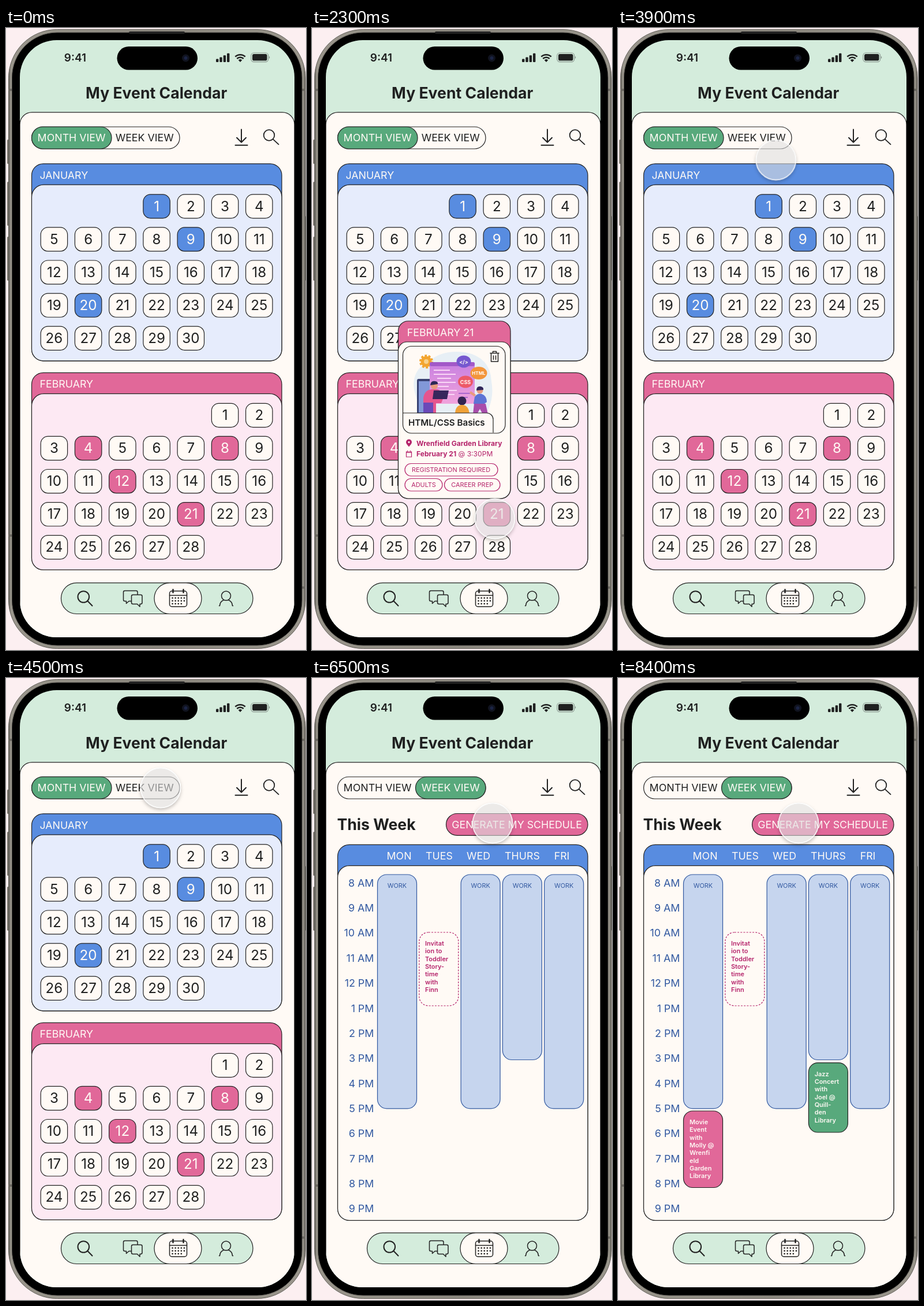
These frames come from a looping animation (520 px wide and 1076 px high, 8.5 s). An HTML page:

```html
<!DOCTYPE html>
<html lang="en">
<head>
<meta charset="utf-8">
<title>My Event Calendar</title>
<style>
  html, body { margin: 0; width: 100%; height: 100%; overflow: hidden; background: #fceff1; }
  svg { display: block; width: 100%; height: 100%; }
  text { font-family: Inter, Roboto, sans-serif; font-optical-sizing: none; font-size: 17.8px; fill: #1f2020; white-space: pre; }
  .ink { stroke: #222; stroke-width: 1.2; }
  .line { fill: none; stroke: #222; stroke-width: 2; stroke-linecap: round; stroke-linejoin: round; }
  .thin { stroke-width: 1.5; }
  .cream { fill: #fffaf5; } .blue { fill: #588ce0; } .pink { fill: #e16899; } .green { fill: #58a97c; }
  text.light { fill: #fffaf5; }
  .head { font-size: 26.6px; font-weight: 700; }
  .day { font-size: 24.2px; }
  .hour, .work { fill: #3158a0; }
  .work, .tag { font-size: 10.9px; }
  .event { font-size: 10.9px; font-weight: 600; }
  .info { font-size: 12.1px; font-weight: 700; }
  .info, .tag, .berry { fill: #b5246b; }
  .outline { fill: none; stroke: #b5246b; stroke-width: 1.2; }
  .shift { fill: #c6d5ee; stroke: #3158a0; stroke-width: 1.2; }

  .month, .week, .popup, .plan, .arrow, .touch { animation: 8.5s linear infinite; }
  .month { animation-name: month; animation-timing-function: step-end; }
  .week { animation-name: week; animation-timing-function: step-end; }
  .popup { animation-name: popup; }
  .plan { animation-name: plan; }
  .arrow { animation-name: arrow; }
  .touch { animation-name: touch; }
  @keyframes month { 0% { opacity: 1 } 54.12%, 100% { opacity: 0 } }
  @keyframes week { 0% { opacity: 0 } 54.12%, 100% { opacity: 1 } }
  @keyframes popup { 0%, 18.8% { opacity: 0 } 21.2%, 33% { opacity: 1 } 35.3%, 100% { opacity: 0 } }
  @keyframes plan { 0%, 84.7% { opacity: 0 } 87%, 100% { opacity: 1 } }
  @keyframes arrow {
    0%, 8.23% { transform: translate(500px, 800px); opacity: 0; animation-timing-function: step-end }
    8.24% { transform: translate(500px, 800px); opacity: 1; animation-timing-function: ease-out }
    11.7%, 12.9% { transform: translate(342px, 836px); opacity: 1; animation-timing-function: step-end }
    12.94%, 100% { transform: translate(342px, 836px); opacity: 0 }
  }
  @keyframes touch {
    0% { transform: translate(336px, 840px); opacity: 0; animation-timing-function: step-end }
    12.94% { transform: translate(336px, 840px); opacity: 1; animation-timing-function: ease-out }
    15.3%, 35.3% { transform: translate(317px, 849px); opacity: 1; animation-timing-function: ease-in-out }
    45.8% { transform: translate(274px, 230px); opacity: 1; animation-timing-function: ease-out }
    49.4%, 64.7% { transform: translate(268px, 190px); opacity: 1; animation-timing-function: ease-in-out }
    74.1%, 100% { transform: translate(313px, 251px); opacity: 1 }
  }
</style>
</head>
<body>
<svg viewBox="0 0 520 1076" preserveAspectRatio="none">
  <defs>
    <linearGradient id="metal">
      <stop offset="0" stop-color="#5f5c56"/><stop offset=".008" stop-color="#9a968c"/>
      <stop offset=".5" stop-color="#8c887f"/><stop offset=".992" stop-color="#9a968c"/>
      <stop offset="1" stop-color="#5f5c56"/>
    </linearGradient>
    <linearGradient id="window" x2="0" y2="1">
      <stop stop-color="#c77fe0"/><stop offset="1" stop-color="#f0a3dc"/>
    </linearGradient>
    <clipPath id="screen"><rect x="24" y="21" width="476" height="1033" rx="64"/></clipPath>
    <clipPath id="art"><rect x="158" y="551" width="176" height="149" rx="15"/></clipPath>
    <filter id="drop" x="-30%" y="-30%" width="160%" height="160%">
      <feDropShadow dx="0" dy="3" stdDeviation="3" flood-opacity=".28"/>
    </filter>
    <mask id="outside" maskUnits="userSpaceOnUse" x="-60" y="-60" width="120" height="120">
      <rect x="-60" y="-60" width="120" height="120" fill="#fff"/><circle r="34.8"/>
    </mask>
  </defs>

  <!-- phone body -->
  <g fill="#77736b">
    <rect x="2" y="193" width="4" height="42" rx="1.5"/>
    <rect x="2" y="266" width="4" height="76" rx="1.5"/>
    <rect x="2" y="361" width="4" height="76" rx="1.5"/>
    <rect x="517" y="325" width="3" height="112" rx="1.5"/>
  </g>
  <rect x="4.5" y="2.5" width="514.5" height="1071" rx="84" fill="url(#metal)" stroke="#5f5c56"/>
  <path d="M4 107h6M4 878h6M513 107h6M513 968h6" stroke="#6c6962" stroke-width="4"/>
  <rect x="10.5" y="8" width="502.5" height="1060" rx="78" stroke="#3d3b38"/>
  <rect x="213" y="6" width="97" height="4" rx="2" fill="#222"/>

  <g clip-path="url(#screen)">
    <rect x="24" y="21" width="476" height="1033" fill="#d4ecdc"/>
    <rect class="cream ink" x="24" y="145.8" width="476" height="960" rx="21"/>
  </g>

  <!-- status bar -->
  <rect x="192.5" y="32" width="139.5" height="40.5" rx="20.2"/>
  <circle cx="311.5" cy="52" r="6.5" fill="#10131f"/>
  <circle cx="311.5" cy="52" r="3" fill="#1b2444"/>
  <text x="120" y="58" text-anchor="middle" style="font-size:19px;font-weight:600">9:41</text>
  <g fill="#1f2020">
    <rect x="364" y="53.5" width="4.4" height="5.5" rx="1.2"/>
    <rect x="370.3" y="50.5" width="4.4" height="8.5" rx="1.2"/>
    <rect x="376.7" y="47.2" width="4.4" height="11.8" rx="1.2"/>
    <rect x="383" y="43.8" width="4.4" height="15.2" rx="1.2"/>
    <path d="M402.7 55.6L406 59l3.3-3.4a4.8 4.8 0 0 0-6.6 0z"/>
    <rect x="427" y="45" width="25.5" height="11.6" rx="2.8"/>
    <path d="M456 48.5q2.4 2.3 0 4.8z" opacity=".5"/>
  </g>
  <path d="M397.3 49.7a12.6 12.6 0 0 1 17.4 0M400.3 53a8.3 8.3 0 0 1 11.4 0" fill="none" stroke="#1f2020" stroke-width="2.5"/>
  <rect x="424.9" y="43" width="29.7" height="15.6" rx="4.6" fill="none" stroke="#8d9992" stroke-width="1.2"/>
  <text class="head" x="260.7" y="121.8" text-anchor="middle">My Event Calendar</text>

  <!-- toolbar -->
  <rect class="cream ink" x="44.5" y="171" width="256.5" height="38" rx="19"/>
  <g class="line">
    <path d="M408 175.5v22M400 189.8l8 8 8-8M397.5 202.8h21"/>
    <circle cx="456" cy="185.5" r="9.3" stroke-width="1.8"/><path d="M462.8 192.3l9.7 9" stroke-width="1.8"/>
  </g>

  <g class="month" id="month"></g>
  <g class="week" id="week"></g>

  <!-- tab bar -->
  <rect class="ink" x="95.5" y="959.8" width="332.5" height="53.7" rx="26.8" fill="#d4ecdc"/>
  <rect class="cream ink" x="257" y="959.8" width="82" height="53.7" rx="26.8"/>
  <g class="line">
    <circle cx="134.3" cy="984" r="9.8"/><path d="M141.5 991.2l8 8.3"/>
    <g class="thin">
      <path d="M217 991.5h-4l-4.500 4v-4h-2.500q-2.500 0-2.500-2.500v-13q0-2.500 2.500-2.500h19.500q2.500 0 2.500 2.500v4"/>
      <path fill="#d4ecdc" d="M220 980.5h13.500q2.500 0 2.500 2.500v11q0 2.500-2.500 2.500h-1.500v4.500l-4.500-4.500H220q-2.500 0-2.500-2.500v-11q0-2.500 2.500-2.500z"/>
      <rect x="283.500" y="974" width="30" height="27" rx="4"/>
      <path d="M283.500 981.500h30"/>
      <circle cx="381.500" cy="982.300" r="8"/>
      <path d="M369.500 999.500h1q.5-7.500 7-10M393.500 999.500h-1q-.5-7.500-7-10"/>
    </g>
    <path d="M289.500 971.500v5M307.500 971.500v5" stroke-width="2.600"/>
    <path d="M288.500 986h22M288.500 991h22M288.500 996h17" stroke-width="2.600" stroke-dasharray=".1 5"/>
  </g>

  <g class="popup">
    <rect class="pink ink" x="149.5" y="507" width="194.5" height="307" rx="17"/>
    <path class="cream ink" d="M149.5 558a15 15 0 0 1 15-15h164.5a15 15 0 0 1 15 15v239a17 17 0 0 1-17 17h-160.500a17 17 0 0 1-17-17z"/>
    <text class="light" x="164.8" y="533">FEBRUARY 21</text>
    <rect class="cream" x="157.5" y="550.5" width="177.5" height="150.5" rx="15"/>
    <g clip-path="url(#art)">
      <path d="M181 640q-16-44 22-64 24-20 62-15 44 8 46 50 6 34-12 60H190z" fill="#e7eff5"/>
      <circle cx="198" cy="577" r="9.5" fill="#f3a52f" stroke="#f3a52f" stroke-width="5" stroke-dasharray="3.5 2.5"/>
      <circle cx="198" cy="577" r="4" fill="#f8d28c"/>
      <rect x="182" y="607" width="30" height="62" rx="3" fill="#394273"/>
      <rect x="185" y="611" width="24" height="54" fill="#8298d8"/>
      <rect x="204" y="578" width="78" height="72" rx="3" fill="url(#window)"/>
      <rect x="204" y="578" width="78" height="7" rx="3" fill="#a259c8"/>
      <path d="M211 592h28M211 599h38M217 606h24M217 613h32M211 620h26M211 627h40M217 634h30" stroke="#f9d7f6" stroke-width="2"/>
      <path d="M254 632h20M254 639h16" stroke="#a968ce" stroke-width="2"/>
      <ellipse cx="263" cy="577" rx="12.5" ry="10.5" fill="#7658cf"/>
      <ellipse cx="289" cy="597" rx="14.5" ry="11" fill="#f3953a"/>
      <ellipse cx="266" cy="612" rx="13" ry="10.5" fill="#ed5968"/>
      <g text-anchor="middle" style="font-weight:700">
        <text class="light" x="263" y="580.5" style="font-size:9px">&lt;/&gt;</text>
        <text class="light" x="289" y="600" style="font-size:8px">HTML</text>
        <text class="light" x="266" y="615.5" style="font-size:9px">CSS</text>
      </g>
      <circle cx="212" cy="619" r="6" fill="#e89a7e"/><path d="M205 618q1-9 9-7 5 1 4 5z" fill="#2d2857"/>
      <path d="M193 668v-28q2-14 15-15h9q10 2 11 14l-4 10h-9v19z" fill="#e4558f"/>
      <path d="M193 648h17v20h-17z" fill="#6b49b8"/>
      <path d="M211 627h26l-3 15h-25z" fill="#37275c"/>
      <circle cx="260" cy="645" r="7.5" fill="#322451"/><path d="M248 669q0-17 12-17t13 17z" fill="#f0a137"/>
      <circle cx="291" cy="627" r="5.5" fill="#e89a7e"/><path d="M285 627q0-8 7-7 6 1 5 6z" fill="#30275a"/>
      <path d="M280 650l2-12q4-6 12-5 9 3 9 14l-7 5h-13z" fill="#5d73d5"/>
      <path d="M283 636l-9-6" stroke="#e89a7e" stroke-width="4"/>
      <path d="M281 650h20l4 18h-9l-5-9-5 9h-7z" fill="#a84dab"/>
      <path class="cream ink" d="M150 666h153a11 11 0 0 1 11 11v30H150z"/>
    </g>
    <rect class="ink" x="157.5" y="550.5" width="177.5" height="150.5" rx="15" fill="none"/>
    <text x="167" y="688" style="font-size:15.2px;font-weight:600">HTML/CSS Basics</text>
    <g class="line"><path class="thin" d="M309 562.5h15M313.500 562v-2.500h6v2.500M310.500 563v14h12v-14M314.500 567v6.500M318.500 567v6.500"/></g>
    <path class="berry" fill-rule="evenodd" d="M168 724.5c-3.500-4-5-6-5-8a5 5 0 0 1 10 0c0 2-1.500 4-5 8zm0-6.500a1.600 1.600 0 1 0 0-3.200 1.600 1.600 0 0 0 0 3.200z"/>
    <path class="outline" d="M163.500 733h9v9h-9zM163.500 734.500h9M165.500 731v2M170.500 731v2"/>
    <text class="info" x="181" y="723">Wrenfield Garden Library</text>
    <text class="info" x="181" y="741">February 21<tspan style="font-weight:400"> @ 3:30PM</tspan></text>
    <g class="outline">
      <rect x="161" y="753.5" width="161" height="21.5" rx="10.7"/>
      <rect x="161" y="779.5" width="65" height="21.5" rx="10.7"/>
      <rect x="229.5" y="779.5" width="96.5" height="21.5" rx="10.7"/>
    </g>
    <g text-anchor="middle">
      <text class="tag" x="241" y="768.3">REGISTRATION REQUIRED</text>
      <text class="tag" x="193.5" y="794.3">ADULTS</text>
      <text class="tag" x="277.7" y="794.3">CAREER PREP</text>
    </g>
  </g>

  <path class="arrow" d="M0 0V20.5L4.7 16 8.2 24.5 11.8 23 8.3 14.8H14.5Z" stroke="#fff" stroke-width="1.3" filter="url(#drop)"/>
  <g class="touch">
    <g mask="url(#outside)"><circle r="34.5" filter="url(#drop)"/></g>
    <circle r="34.5" fill="#e0e0e0" fill-opacity=".6" stroke="#fff" stroke-opacity=".85" stroke-width="1.8"/>
  </g>
</svg>
<script>
const rect = (cls, x, y, w, h, r, more = '') =>
  `<rect class="${cls}" x="${x}" y="${y}" width="${w}" height="${h}" rx="${r}" ${more}/>`;
const text = (cls, x, y, str, anchor = 'start') =>
  `<text class="${cls}" x="${x}" y="${y}" text-anchor="${anchor}">${str}</text>`;
const lines = (cls, x, y, list) => list.map((s, i) => text(cls, x, y + i * 13.3, s)).join('');
const arc = (r, dx, dy) => `a${r} ${r} 0 0 1 ${dx} ${dy}`;

// card with a coloured header and a body overlapping it with rounded top corners
const card = (color, fill, y, bottom, bodyY, r) =>
  rect(color + ' ink', 44.5, y, 433.5, bottom - y, 20) +
  `<path class="ink" fill="${fill}" d="M44.5 ${bodyY + r}${arc(r, r, -r)}h${433.5 - 2 * r}${arc(r, r, r)}` +
  `V${bottom - 20}${arc(20, -20, 20)}h-393.5${arc(20, -20, -20)}z"/>`;

const toggle = (x, w, monthCls, weekCls) =>
  rect('green ink', x, 171, w, 38, 19) +
  text(monthCls, 113.6, 196, 'MONTH VIEW', 'middle') +
  text(weekCls, 240.2, 196, 'WEEK VIEW', 'middle');

function monthCard(name, color, fill, top, first, count, marked) {
  let out = card(color, fill, top, top + 341, top + 36.3, 21) + text('light', 58.5, top + 25.8, name);
  for (let d = 1; d <= count; d++) {
    const slot = first + d - 1, on = marked.includes(d);
    const x = 83.4 + slot % 7 * 59.23, y = top + 73.7 + Math.floor(slot / 7) * 57.05;
    out += rect((on ? color : 'cream') + ' ink', x - 23.2, y - 20.6, 46.4, 41.2, 12.5) +
      text(on ? 'day light' : 'day', x, y + 8.2, d, 'middle');
  }
  return out;
}

function weekTable() {
  let out = text('head', 43.5, 262.5, 'This Week') +
    rect('pink ink', 232.5, 234.5, 245.5, 37.8, 18.9) +
    text('light', 355, 259.7, 'GENERATE MY SCHEDULE', 'middle') +
    card('blue', '#fffaf5', 288.3, 938.3, 324.6, 20);
  [['MON', 151], ['TUES', 220.5], ['WED', 288.5], ['THURS', 364.5], ['FRI', 433]]
    .forEach(([day, x]) => out += text('light', x, 314, day, 'middle'));
  for (let i = 0; i < 14; i++) {
    const h = i + 8;
    out += text('hour', 107.3, 360.7 + i * 43.36, (h > 12 ? h - 12 : h) + (h < 12 ? ' AM' : ' PM'), 'end');
  }
  for (const [col, end] of [[0, 744.8], [2, 744.8], [3, 660.5], [4, 744.8]]) {
    const x = 113.5 + col * 72.3;
    out += rect('shift', x, 340, 68, end - 340, 16) + text('work', x + 34, 362.6, 'WORK', 'middle');
  }
  out += rect('outline', 185.8, 440, 68, 127, 16, 'stroke-dasharray="3 2.2"') +
    lines('event berry', 196, 463, ['Invitat', 'ion to', 'Toddler', 'Story-', 'time', 'with', 'Finn']);
  const plan = rect('pink ink', 113.5, 749, 68, 132.5, 16) +
    lines('event light', 124, 772, ['Movie', 'Event', 'with', 'Molly @', 'Wrenfi', 'eld', 'Garden', 'Library']) +
    rect('green ink', 330.4, 665.7, 68, 120.3, 16) +
    lines('event light', 340.7, 688.8, ['Jazz', 'Concert', 'with', 'Joel @', 'Quill-', 'den', 'Library']);
  return out + `<g class="plan">${plan}</g>`;
}

document.getElementById('month').innerHTML =
  toggle(44.5, 138.5, 'light', '') +
  monthCard('JANUARY', 'blue', '#e6ecfc', 234.8, 3, 30, [1, 9, 20]) +
  monthCard('FEBRUARY', 'pink', '#fde9f3', 596.3, 5, 28, [4, 8, 12, 21]);
document.getElementById('week').innerHTML = toggle(179.5, 121.5, '', 'light') + weekTable();
</script>
</body>
</html>
```
